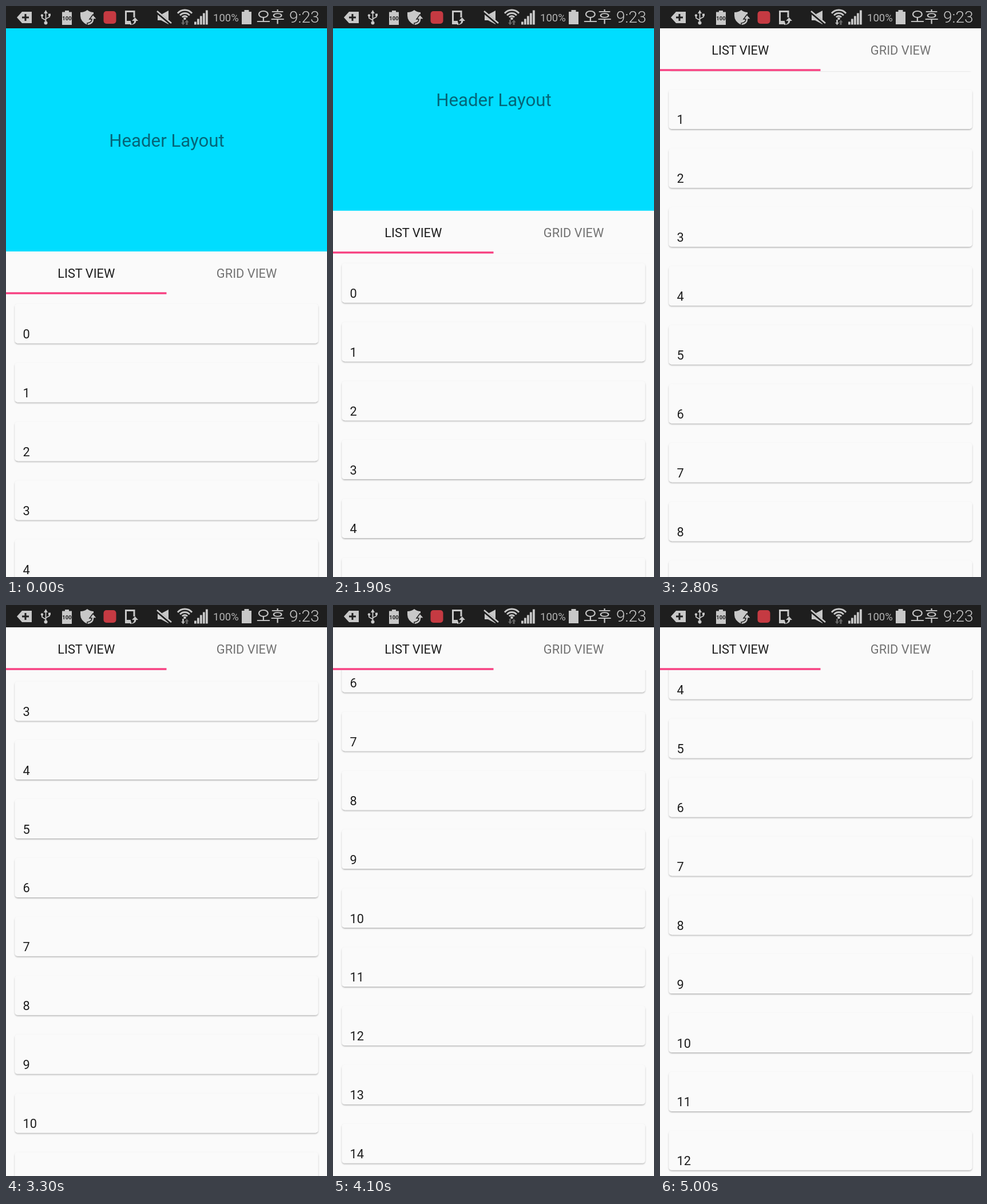
Recreate the animation shown at these times as an HTML page. Size 561 by 998 pixels, loop 5.1 s.

```html
<!DOCTYPE html>
<html lang="en">
<head>
<meta charset="utf-8">
<title>Header layout scroll</title>
<style>
  html, body { margin: 0; width: 100%; height: 100%; overflow: hidden; background: #fafafa; }
  svg { display: block; width: 100vw; height: 100vh; }
  text { font-family: Roboto, sans-serif; }
  .body { font-size: 21.8px; fill: #1d1d1d; }
  .mid { text-anchor: middle; }
  .line { fill: none; stroke: #c8c8c8; }
</style>
</head>
<body>
<svg viewBox="0 0 561 998" preserveAspectRatio="none">
  <defs>
    <filter id="shadow" x="-5%" y="-15%" width="110%" height="135%">
      <feDropShadow dx="0" dy="1.5" stdDeviation="1.2" flood-color="#000" flood-opacity=".3"/>
    </filter>
  </defs>
  <rect width="561" height="998" fill="#fafafa"/>
  <g id="list"></g>

  <g id="header">
    <rect y="39" width="561" height="390" fill="#00ddff"/>
    <text class="mid" x="281" y="246" font-size="31.2" fill="#04667a">Header Layout</text>
    <rect y="429" width="561" height="75" fill="#fafafa"/>
    <text class="body mid" x="140.3" y="474.7">LIST VIEW</text>
    <text class="body mid" x="420.6" y="474.7" style="fill:#737373">GRID VIEW</text>
    <rect y="500.3" width="280.5" height="3.4" fill="#f73f80"/>
  </g>

  <g id="status" fill="#c8c8c8">
    <rect width="561" height="39" fill="#1e1e1e"/>
    <!-- tag with plus -->
    <path d="M19 20 28 10H45V30H28Z"/>
    <path d="M28 20H40M34 14V26" stroke="#1e1e1e" stroke-width="3"/>
    <!-- usb -->
    <path class="line" d="M69.500 11V29M69.500 25 63 21V17M69.500 22.500 76 19V16" stroke-width="1.8"/>
    <path d="M69.500 7 73 13H66Z"/>
    <circle cx="69.500" cy="29.500" r="3"/><circle cx="63" cy="16.500" r="2.2"/>
    <rect x="74" y="13.500" width="4" height="4"/>
    <!-- charge -->
    <path d="M103 8H110V10.500H115V33H98V10.500H103Z"/>
    <text class="mid" x="106.500" y="25.300" font-size="9.500" font-weight="700" fill="#1e1e1e">100</text>
    <!-- shield -->
    <path d="M130 11Q137 11 142 7Q147 11 153 11V17Q153 27 142 33Q130 27 130 17Z"/>
    <path d="M142 30Q150 29 150 23H146L152 15 159 23H154Q154 33 142 34Z" stroke="#1e1e1e" stroke-width="1.500"/>
    <rect x="170.500" y="9" width="22" height="22" rx="5" fill="#c53a42"/>
    <!-- phone with arrow -->
    <path class="line" d="M224 20V9.500H209.500V30.500H219" stroke-width="3"/>
    <path d="M208 26H218V32H208Z"/>
    <path d="M217 32Q224 32 224 26H220L225.500 20 231 26H227.500Q227 33 217 33Z"/>
    <!-- muted speaker -->
    <path d="M265 15H271L284 8V32L271 25H265Z"/>
    <path d="M263 10 288 31" stroke="#1e1e1e" stroke-width="5"/>
    <path d="M264 9 289 30" stroke="#c8c8c8" stroke-width="2.500"/>
    <!-- wifi and data arrows -->
    <g id="wifi" class="line" stroke-width="2.800"></g>
    <circle cx="312.500" cy="22" r="2.300"/>
    <path id="down" d="M308 24H311V29H313L309.500 33.500 306 29H308Z"/>
    <path d="M314.500 33H317.500V28.500H319.500L316 24 312.500 28.500H314.500Z" fill="#666"/>
    <g id="bars"></g>
    <text x="362" y="27" font-size="18.500" fill="#b4b4b4">100%</text>
    <path d="M416.500 7H424.500V10H429V32H412V10H416.500Z"/>
    <text x="437.500" y="28.500" font-size="27" style="font-family:'Noto Sans CJK KR','Noto Sans CJK',sans-serif;font-weight:300">오후</text>
    <text x="495" y="29" font-size="28" font-weight="300">9:23</text>
  </g>
</svg>
<script>
const LOOP = 5100, STEP = 100, PITCH = 102.9, HEADER = 390;
const $ = id => document.getElementById(id);

function add(parent, name, attrs, label = '') {
  const el = document.createElementNS('http://www.w3.org/2000/svg', name);
  for (const key in attrs) el.setAttribute(key, attrs[key]);
  el.textContent = label;
  parent.appendChild(el);
}

for (let i = 0; i < 18; i++) {
  const y = 520.5 + i * PITCH;
  add($('list'), 'rect', { x: 15.5, y, width: 530, height: 69, rx: 5, fill: '#fafafa', filter: 'url(#shadow)' });
  add($('list'), 'text', { x: 29.6, y: y + 60.5, class: 'body' }, i);
}
for (const r of [6, 11, 16.5]) {
  const dx = r * 0.76, y = 23.5 - r * 0.65;
  add($('wifi'), 'path', { d: `M${312.5 - dx} ${y}A${r} ${r} 0 0 1 ${312.5 + dx} ${y}` });
}
for (let i = 0; i < 5; i++) {
  const h = 5 + i * 5;
  add($('bars'), 'rect', { x: 329 + i * 5, y: 32.5 - h, width: 3.8, height: h });
}

// Scroll offset keys: [ms, px], joined by a monotone cubic.
const keys = [[1500, 0], [1700, 12], [2200, 216], [2800, 477.5], [3300, 696],
              [4100, 1054.5], [4400, 858], [5000, 836.5]];
const rate = i => (keys[i + 1][1] - keys[i][1]) / (keys[i + 1][0] - keys[i][0]);

function slope(i) {
  if (i === 0 || i === keys.length - 1) return 0;
  const a = rate(i - 1), b = rate(i);
  return a * b > 0 ? 2 * a * b / (a + b) : 0;
}

function scrollAt(t) {
  const last = keys.length - 1;
  if (t <= keys[0][0]) return keys[0][1];
  if (t >= keys[last][0]) return keys[last][1];
  const i = keys.findIndex(k => k[0] > t) - 1;
  const [t0, p0] = keys[i], [t1, p1] = keys[i + 1];
  const h = t1 - t0, u = (t - t0) / h, v = 1 - u;
  return p0 * v * v * (1 + 2 * u) + p1 * u * u * (3 - 2 * u)
       + h * u * v * (slope(i) * v - slope(i + 1) * u);
}

function draw(ms) {
  const t = Math.floor(ms % LOOP / STEP) * STEP;
  const s = scrollAt(t);
  $('list').setAttribute('transform', `translate(0 ${-s})`);
  $('header').setAttribute('transform', `translate(0 ${-Math.min(s, HEADER)})`);
  $('down').setAttribute('fill', t >= 2500 && t < 3500 ? '#b4b4b4' : '#666');
}

const start = performance.now();
function tick() {
  draw(performance.now() - start);
  requestAnimationFrame(tick);
}
tick();
</script>
</body>
</html>
```
